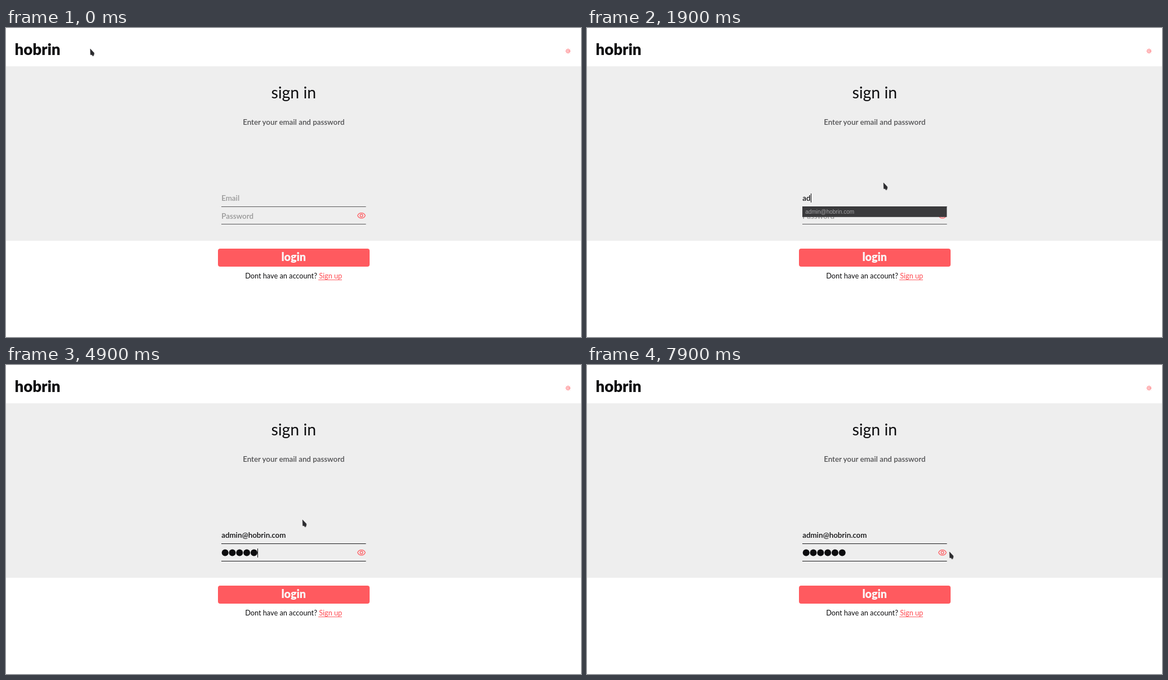
An HTML page for the animation above (8000 ms loop, 1020 by 549 pixels).

```html
<!DOCTYPE html>
<html lang="en">
<head>
<meta charset="utf-8">
<title>sign in</title>
<style>
  html, body { margin: 0; width: 100%; height: 100%; overflow: hidden; background: #fff; }
  svg { display: block; width: 1020px; height: 549px; }
  text { font-family: Lato, sans-serif; fill: #0d0d0f; white-space: pre; }
  .mid { text-anchor: middle; }
  .field { font-size: 13.4px; font-weight: 600; }
  .hint { fill: #979797; }
  .head { font-weight: 900; }
  .icon { fill: none; stroke: #ff5a5f; stroke-width: 1.2; stroke-linecap: round; stroke-linejoin: round; }
  #tip { font: 10px "Liberation Sans", Arial, sans-serif; }
</style>
</head>
<body>
<svg viewBox="0 0 1020 549">
  <rect width="1020" height="549" fill="#fff"/>
  <rect y="68" width="1020" height="310" fill="#eee"/>
  <text class="head" x="15.5" y="48" font-size="27.5">hobrin</text>
  <g class="icon" transform="translate(997 41)">
    <circle r="2.1" stroke-width="1"/>
    <g id="rays" stroke-width="1"></g>
  </g>

  <text class="mid" x="510.3" y="125" font-size="28.4">sign in</text>
  <text class="mid" x="510.3" y="172.4" font-size="13.35" font-weight="600" style="fill:#505052">Enter your email and password</text>

  <rect id="line1" x="382" y="317" width="256.5" height="1"/>
  <rect id="line2" x="382" y="348" width="256.5" height="1"/>
  <text id="hint1" class="field hint" x="382.2" y="307">Email</text>
  <text id="hint2" class="field hint" x="382.2" y="338.5">Password</text>
  <text id="mail" class="field" x="382.2" y="307"></text>
  <text id="plain" class="field" x="382.2" y="338.5">secret</text>
  <g id="dots" fill="#0d0d0f"></g>
  <rect id="caret" width="1" height="16" fill="#0d0d0f"/>

  <g class="icon" transform="translate(630.5 333.3)">
    <path d="M-6.8 0C-4.2-6.2 4.2-6.2 6.8 0C4.2 6.2-4.2 6.2-6.8 0Z"/>
    <circle r="2.4"/>
    <path id="slash" d="M-5.5-5.5L5.5 5.5"/>
  </g>

  <g id="menu">
    <rect x="382" y="317.2" width="256.3" height="18.6" fill="#3a3a3c"/>
    <rect id="glow" x="384" y="319" width="253" height="16" fill="#58585b"/>
    <text id="tip" x="387.3" y="330.3">admin@hobrin.com</text>
  </g>

  <rect x="376" y="392" width="269" height="32" rx="4" fill="#ff5a5f"/>
  <text class="mid head" x="510.3" y="413.5" font-size="19.8">login</text>
  <text class="mid" x="510.2" y="445" font-size="12.72">Dont have an account? <tspan fill="#ff4b51">Sign up</tspan></text>
  <rect x="554" y="447" width="42" height="1" fill="#ff5a5f"/>

  <g id="cursor">
    <path d="M1 1.5L8 8.5L7 12.5L5 14L1 11Z" fill="#000" opacity=".15"/>
    <path d="M0 0L6.8 7.2L6.2 11L4.6 12.9L3.2 10.4L.4 10.6Z" fill="#2b2b2e" stroke="#2b2b2e" stroke-width=".5"/>
  </g>
</svg>
<script>
const NS = 'http://www.w3.org/2000/svg';
const LOOP = 8000, STEP = 100, LEFT = 382.3, PITCH = 12.8;
const DARK = '#1c1c1e', GREY = '#58585a';
const $ = id => document.getElementById(id);
const show = (id, on) => { $(id).style.display = on ? '' : 'none'; };
const add = (parent, tag, attrs) => {
  const el = document.createElementNS(NS, tag);
  for (const k in attrs) el.setAttribute(k, attrs[k]);
  return $(parent).appendChild(el);
};

document.querySelector('text.mid.head').style.fill = '#fafafa';
for (let i = 0; i < 8; i++) {
  add('rays', 'path', { d: 'M0-3.2V-4.2', transform: `rotate(${i * 45})` });
}
const dots = Array.from({ length: 6 }, (_, i) =>
  add('dots', 'circle', { cx: LEFT + PITCH * (i + .5), cy: 333.6, r: 6 }));

// each pointer move is one cubic curve
const moves = [
  { from: 0, to: 800, x: [149.5, 270, 363, 428], y: [37, 316, 404, 301] },
  { from: 1300, to: 1900, x: [428, 467, 500, 526], y: [301, 293, 284, 275] },
  { from: 5700, to: 6500, x: [526, 564, 750, 625], y: [275, 250, 350, 336] },
  { from: 7700, to: 7900, x: [625, 631, 637, 643], y: [336, 336, 335, 332] }
];
const typed = [[1500, 'a'], [1700, 'ad'], [2800, 'admin@hobrin.com']];
const keys = [4100, 4200, 4400, 4700, 4900, 5100];

const cubic = ([a, b, c, d], k) => {
  const n = 1 - k;
  return a * n ** 3 + 3 * b * k * n * n + 3 * c * k * k * n + d * k ** 3;
};

function pointer(t) {
  const { from, to, x, y } = moves.filter(m => t >= m.from).pop();
  const k = Math.min(1, (t - from) / (to - from));
  return [cubic(x, k), cubic(y, k)];
}

function draw(time) {
  const t = Math.floor(time % LOOP / STEP) * STEP;
  const within = (a, b) => t >= a && t < b;

  const mail = typed.reduce((s, [at, text]) => t >= at ? text : s, '');
  const count = keys.filter(k => t >= k).length;
  const open = within(6700, 7800);
  $('mail').textContent = mail;
  show('hint1', !mail);
  show('hint2', !count);
  show('plain', open);
  show('slash', open);
  dots.forEach((d, i) => { d.style.display = i < count && !open ? '' : 'none'; });
  $('line1').setAttribute('fill', t >= 1400 ? DARK : GREY);
  $('line2').setAttribute('fill', t >= 3100 ? DARK : GREY);

  show('menu', within(1800, 2800));
  show('glow', within(2400, 2800));
  $('tip').style.fill = t >= 2400 ? '#dcdcdc' : '#a5a5a7';

  const second = t >= 3100;
  show('caret', within(1400, 2600) || within(2800, 5500));
  $('caret').setAttribute('x', second ? Math.floor(LEFT + PITCH * count)
    : Math.round(LEFT + (mail ? $('mail').getComputedTextLength() : 0)));
  $('caret').setAttribute('y', second ? 326 : 294);

  $('cursor').setAttribute('transform', `translate(${pointer(t)})`);
}

const start = performance.now();
function tick() {
  draw(performance.now() - start);
  requestAnimationFrame(tick);
}
tick();
</script>
</body>
</html>
```
